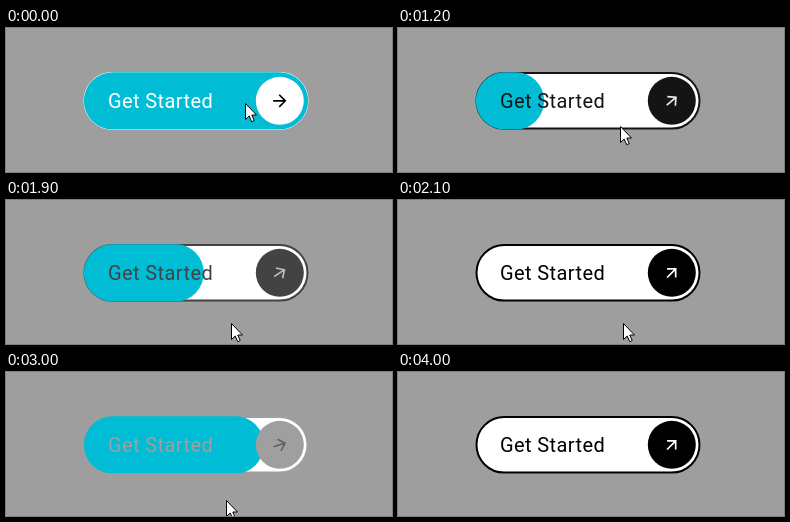
These frames come from a looping animation (386x144 px, 5200 ms). An HTML page:

```html
<!DOCTYPE html>
<html lang="en">
<head>
<meta charset="utf-8">
<title>Get Started button</title>
<style>
  html, body { margin: 0; width: 100%; height: 100%; overflow: hidden; background: #9e9e9e; }
  svg { display: block; width: 386px; height: 144px; }
  text { font: 400 20px Roboto, Arial, sans-serif; letter-spacing: .4px; }
</style>
</head>
<body>
<svg viewBox="0 0 386 144">
  <clipPath id="pill"><rect x="77.8" y="44.3" width="224.4" height="57" rx="28.5"/></clipPath>
  <rect id="base" x="78.5" y="45" width="223" height="55.6" rx="27.8" fill="#fff" stroke-width="2"/>
  <g clip-path="url(#pill)">
    <rect id="fill" x="77.5" y="44" width="225" height="57.6" rx="28.8" fill="#00bcd4"/>
  </g>
  <text id="label" x="102" y="80">Get Started</text>
  <circle id="disc" cx="273.8" cy="72.8" r="24"/>
  <path id="arrow" d="M12 4l-1.41 1.41L16.17 11H4v2h12.17l-5.58 5.59L12 20l8-8z"/>
  <path id="cursor" d="M.5 .5V16.5L4.2 13 6.7 18.7 9.2 17.6 6.8 12H11.5Z" fill="#fff" stroke="#000" stroke-linejoin="round"/>
</svg>
<script>
const LOOP = 5200, STEP = 100, FADE = 200;

// [enter, leave] times of each hover
const hovers = [[-FADE, 583], [1182, 1812], [2684, 2953]];

// cursor runs of [time, x, y]; hidden outside them
const runs = [
  [[0, 239, 75], [200, 238, 78], [400, 236, 87], [500, 235, 96], [600, 234, 109], [690, 233, 144]],
  [[900, 222, 138], [1000, 222, 130], [1100, 222, 118], [1200, 222, 98], [1300, 222, 84],
   [1400, 222, 81], [1500, 223, 83], [1700, 224, 92], [1800, 225, 112], [1900, 225, 123],
   [2300, 225, 123], [2500, 222, 114], [2600, 221, 104], [2700, 220, 84], [2800, 220, 76],
   [2900, 220, 88], [3000, 220, 128], [3090, 220, 144]],
  [[3700, 220, 136], [3999, 220, 136]]
];

const $ = id => document.getElementById(id);
const [base, fill, label, disc, arrow, cursor] =
  ['base', 'fill', 'label', 'disc', 'arrow', 'cursor'].map($);

const clamp = v => Math.min(1, Math.max(0, v));
const bez = (a, b, s) => 3 * a * s * (1 - s) ** 2 + 3 * b * s * s * (1 - s) + s ** 3;

// cubic-bezier(.25, .1, .25, 1)
function ease(x) {
  if (x <= 0 || x >= 1) return clamp(x);
  let lo = 0, hi = 1;
  for (let i = 0; i < 24; i++) {
    const mid = (lo + hi) / 2;
    if (bez(.25, .25, mid) < x) lo = mid; else hi = mid;
  }
  return bez(.1, 1, lo);
}

function hoverLevel(t) {
  return Math.max(...hovers.map(([enter, leave]) =>
    t < leave ? ease((t - enter) / FADE) : 1 - ease((t - leave) / FADE)));
}

function cursorAt(t) {
  const run = runs.find(r => t >= r[0][0] && t <= r[r.length - 1][0]);
  if (!run) return null;
  const i = Math.max(1, run.findIndex(k => k[0] >= t));
  const [a, b] = [run[i - 1], run[i]];
  const k = (t - a[0]) / (b[0] - a[0]);
  return [1, 2].map(n => Math.round(a[n] + (b[n] - a[n]) * k));
}

function gray(v) {
  const n = Math.round(255 * v);
  return `rgb(${n},${n},${n})`;
}

function draw(t) {
  const level = hoverLevel(t);
  const ink = gray(level);
  base.setAttribute('stroke', ink);
  label.setAttribute('fill', ink);
  disc.setAttribute('fill', ink);
  arrow.setAttribute('fill', gray(1 - level));
  arrow.setAttribute('transform',
    `translate(273.8 72.8) rotate(${-45 * (1 - level)}) scale(.833) translate(-12 -12)`);
  fill.setAttribute('transform', `translate(${225 * (level ** .47 - 1)})`);
  fill.setAttribute('visibility', level > 0 ? 'visible' : 'hidden');
  const at = cursorAt(t);
  cursor.setAttribute('visibility', at ? 'visible' : 'hidden');
  if (at) cursor.setAttribute('transform', `translate(${at})`);
}

const start = performance.now();
function tick() {
  const t = (performance.now() - start) % LOOP;
  draw(Math.floor(t / STEP) * STEP);
  requestAnimationFrame(tick);
}
tick();
</script>
</body>
</html>
```
